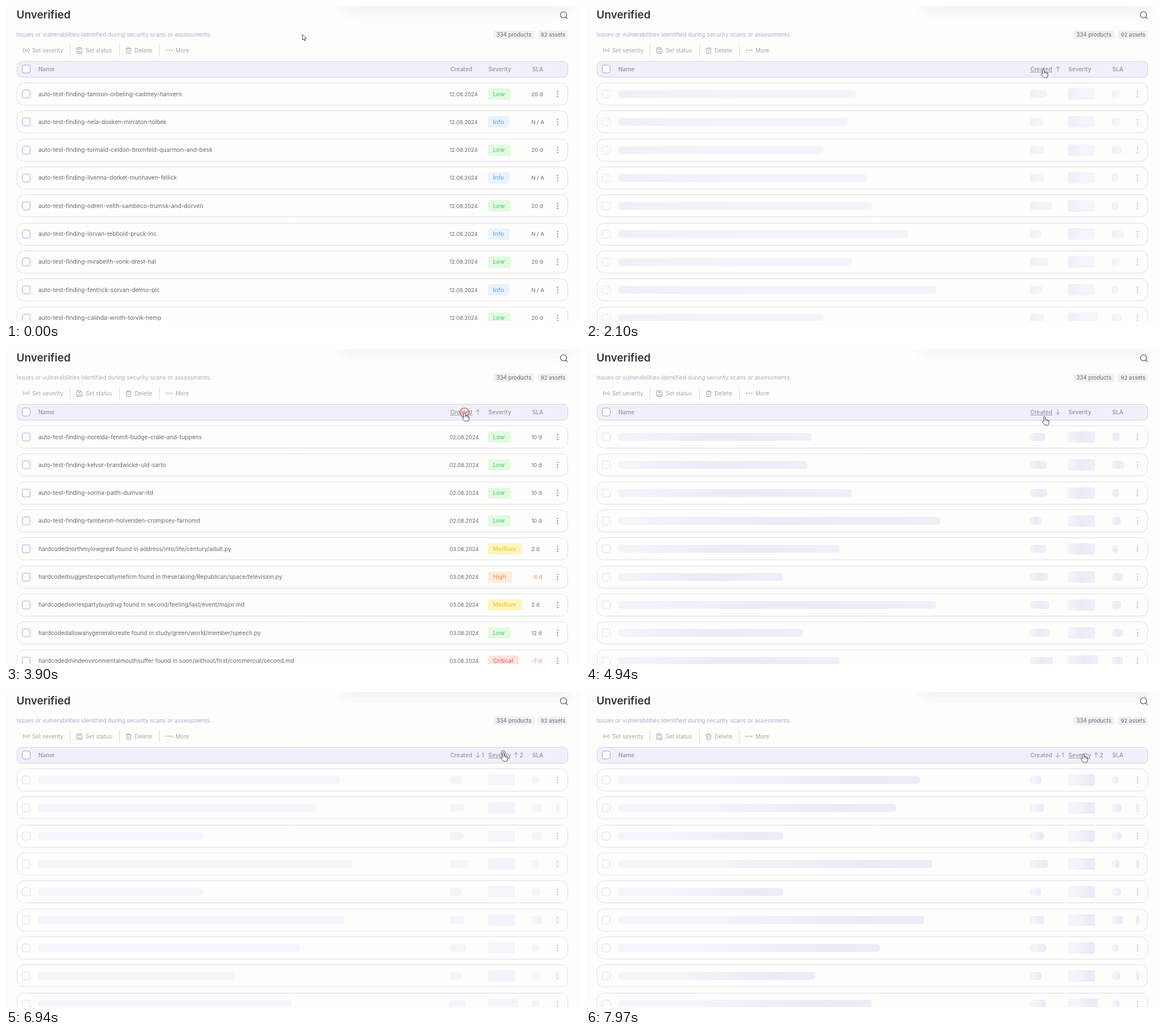
Write an HTML page with a canvas that moves like this. It is 1009 by 555 pixels and loops after 8 s.

```html
<!DOCTYPE html>
<html lang="en">
<head>
<meta charset="utf-8">
<title>Unverified findings</title>
<style>
  html, body { margin: 0; width: 100%; height: 100%; overflow: hidden; background: #fdfdfb; }
  canvas { display: block; }
</style>
</head>
<body>
<canvas id="stage" width="1009" height="555"></canvas>
<script>
const ctx = document.getElementById('stage').getContext('2d');
const LOOP = 8000, SHIMMER = 1400, CHAR = 7.07;
const PAPER = '#fdfdfb', GRAY = '#a8a8ae', DARK = '#6a6a6d';

const auto = (name, sev) => ['auto-test-finding-' + name, '12.08.2024', sev, sev === 'Low' ? '20 d' : 'N / A'];
const early = name => ['auto-test-finding-' + name, '02.08.2024', 'Low', '10 d'];
const coded = (name, path, sev, sla) => [`hardcoded${name} found in ${path}`, '03.08.2024', sev, sla];

const newest = [
  'tamson-orbeling-cadmey-hanvern', 'nela-dosken-mirraton-tolbek',
  'tormald-celdon-bromfeld-quarmon-and-besk', 'ilvenna-dorket-munhaven-fellick',
  'odren-velth-sambeco-trumsk-and-dorven', 'lorvan-tebbold-pruck-inc',
  'mirabelth-vonk-drest-hal', 'fentrick-sorvan-delmo-plc', 'calinda-wroth-torvik-hemp'
].map((name, i) => auto(name, i % 2 ? 'Info' : 'Low'));

const oldest = [
  early('norelda-fenmit-budge-crale-and-tuppens'),
  early('kelvor-brandwicke-uld-sarto'),
  early('sorina-palth-dumvar-ltd'),
  early('tamberon-holvenden-crompsey-farnomd'),
  coded('northmylowgreat', 'address/into/life/century/adult.py', 'Medium', '2 d'),
  coded('suggestespeciallymefirm', 'these/along/Republican/space/television.py', 'High', '-4 d'),
  coded('seriespartybuydrug', 'second/feeling/last/event/major.md', 'Medium', '2 d'),
  coded('allowanygeneralcreate', 'study/green/world/member/speech.py', 'Low', '12 d'),
  coded('mindenvironmentalmouthsuffer', 'soon/without/first/commercial/second.md', 'Critical', '-7 d')
];

// Placeholder sizes: name in characters, date and SLA in pixels
const skeletons = [
  { name: [59, 57, 51, 62, 63, 72, 58, 79, 51], date: [30, 24, 25, 25, 40, 20, 33, 22, 26], sla: [14, 15, 18, 12, 13, 21, 14, 12, 17] },
  { name: [48, 47, 58, 80, 55, 41, 79, 46, 55], date: [28, 30, 31, 21, 29, 33, 34, 35, 41], sla: [14, 22, 13, 16, 12, 20, 17, 20, 20] },
  { name: [75, 69, 41, 78, 41, 76, 65, 49, 63], date: [21, 25, 25, 33, 20, 25, 29, 21, 29], sla: [12, 18, 17, 14, 16, 20, 12, 15, 14] }
];

const pills = {
  Low: [40, '#e2fae2', '#6ad684'],
  Info: [38, '#e9f2fd', '#7fb4f3'],
  Medium: [60, '#fef5bd', '#ebcd55'],
  High: [43, '#fdebd9', '#f1a566'],
  Critical: [54, '#fde3e2', '#ee7672']
};

const phases = [
  { from: 0, rows: newest, sort: '' },
  { from: 1610, bars: skeletons[0], sort: 'up' },
  { from: 3030, rows: oldest, sort: 'up' },
  { from: 4000, bars: skeletons[1], sort: 'down' },
  { from: 5420, rows: newest, sort: 'down' },
  { from: 6890, bars: skeletons[2], sort: 'both' }
];
const releases = [1590, 3980, 6880];

const cursorKeys = [
  [0, 521, 50], [370, 521, 50], [1170, 804, 111], [3100, 804, 111], [3600, 806, 112],
  [4100, 806, 112], [4500, 806, 119], [5700, 806, 119], [6500, 874, 107],
  [7100, 874, 107], [7500, 874, 109], [LOOP, 874, 109]
];
const arrowShape = new Path2D('M0 0V10L2.3 7.900L3.700 11.200L5.300 10.500L4 7.300H6.900Z');
const handShape = new Path2D('M-1.4 9V1.2Q-1.4 0 0 0T1.4 1.2V5.5Q3.5 4.5 4 6Q6 5.3 6.3 6.8Q8 6.3 8 8V11L6.7 15H.3L-3.6 9.8Q-4.2 8-2.6 8Z');

function text(str, x, y, size, color, weight = 400) {
  ctx.font = `${weight} ${size}px Inter, sans-serif`;
  ctx.fillStyle = color;
  ctx.fillText(str, x, y);
}

function box(x, y, w, h, r, fill, stroke) {
  ctx.beginPath();
  ctx.roundRect(x, y, w, h, r);
  if (fill) { ctx.fillStyle = fill; ctx.fill(); }
  if (stroke) { ctx.strokeStyle = stroke; ctx.lineWidth = 1; ctx.stroke(); }
}

function line(path, color, width = 1) {
  ctx.strokeStyle = color;
  ctx.lineWidth = width;
  ctx.stroke(new Path2D(path));
}

function dots(points, r, color) {
  ctx.fillStyle = color;
  for (const [x, y] of points) {
    ctx.beginPath();
    ctx.arc(x, y, r, 0, 7);
    ctx.fill();
  }
}

// Soft shadow cast by a panel above the stage
function drawPanelShadow() {
  ctx.save();
  ctx.shadowColor = 'rgba(60, 60, 50, .07)';
  ctx.shadowBlur = 24;
  ctx.shadowOffsetY = 6;
  box(590, -60, 400, 60, 8, PAPER);
  ctx.restore();
}

function drawTop() {
  drawPanelShadow();
  text('Unverified', 18.5, 22, 18.9, '#333337', 600);
  line('M985.5 15.5a5.5 5.5 0 1 1-11 0a5.5 5.5 0 1 1 11 0M984 19.5L987 22.5', '#45454a', 1.1);
  text('Issues or vulnerabilities identified during security scans or assessments.', 18.5, 54, 10, '#adacd0');
  box(857, 43, 72, 15, 3, '#f1f0f5');
  text('334 products', 862, 54, 9.7, DARK);
  box(935, 43, 52, 15, 3, '#f1f0f5');
  text('92 assets', 940, 54, 9.5, DARK);

  line('M32 74Q28.500 78 32 82M34 76Q32 78 34 80M37 76Q39 78 37 80M39 74Q42.500 78 39 82', GRAY);
  dots([[35.5, 78]], 1, GRAY);
  line('M124.500 73.500h7l2 2v8h-9zM127 73.500v3h4v-3M127 83.500v-3h4v3', GRAY);
  line('M210.500 75.500h10M213.500 75.500v-2h4v2M211.500 75.500l.7 8h6.600l.7-8M214.300 78v3M216.700 78v3', GRAY);
  dots([[282.5, 78], [287, 78], [291.5, 78]], 1.2, GRAY);
  text('Set severity', 46, 81.5, 9.8, GRAY);
  text('Set status', 140, 81.5, 9.8, GRAY);
  text('Delete', 226, 81.5, 10.2, GRAY);
  text('More', 298, 81.5, 9.8, GRAY);
  line('M112.500 68v21M199.500 68v21M269.500 68v21', '#dadadd');
}

function sortArrow(x, up) {
  const tip = up ? 106.5 : 115.5, back = up ? 4 : -4;
  line(`M${x} 106.500V115.500M${x - 3.5} ${tip + back}L${x} ${tip}L${x + 3.5} ${tip + back}`, GRAY, 1.1);
}

function drawHeader(sort, hover) {
  box(19.5, 97.5, 968, 28, 8, '#f1eff9', '#d7d3ee');
  box(28.5, 104, 14, 14, 3.5, PAPER, '#aaa0dc');
  [['Name', 57], ['Created', 781], ['Severity', 848], ['SLA', 925]].forEach(([label, x]) => {
    text(label, x, 114.5, 10, '#a0a0a8', 600);
    if (label === hover) line(`M${x} 116.500h39`, '#a0a0a8');
  });
  if (sort) sortArrow(829.5, sort === 'up');
  if (sort === 'both') {
    text('1', 836, 114.5, 10, '#a0a0a8', 600);
    sortArrow(896.5, true);
    text('2', 903, 114.5, 10, '#a0a0a8', 600);
  }
}

function shimmerBar(x, cy, w, h, progress) {
  const left = x - 3 * w * (1 - progress);
  const fill = ctx.createLinearGradient(left, 0, left + 4 * w, 0);
  fill.addColorStop(.25, '#f5f4fb');
  fill.addColorStop(.37, '#eceaf6');
  fill.addColorStop(.63, '#f5f4fb');
  box(x, cy - h / 2, w, h, h === 20 ? 4 : 5, fill);
}

function drawRow(i, phase, t) {
  const cy = 155 + i * 49.33, base = cy + 3.5;
  const top = Math.round(cy - 20) + .5;
  box(19.5, top, 968, 39, 12, null, '#dfdcf1');
  box(28.5, Math.round(cy) - 7, 14, 14, 3.5, null, phase.bars ? '#dfdde8' : '#aaa0dc');
  dots([-4.5, 0, 4.5].map(d => [969.5, cy + d]), 1.2, phase.bars ? '#b9b9c2' : '#8f8f97');

  if (phase.bars) {
    const progress = (t - phase.from) / SHIMMER % 1;
    const bars = phase.bars;
    shimmerBar(57, cy, bars.name[i] * CHAR, 14, progress);
    shimmerBar(780, cy, bars.date[i], 14, progress);
    shimmerBar(847, cy, i === 8 ? 53 : 48, 20, progress);
    shimmerBar(924, cy, bars.sla[i], 14, progress);
    return;
  }
  const [name, date, severity, sla] = phase.rows[i];
  const [width, fill, color] = pills[severity];
  text(name, 57, base, 10.2, DARK);
  text(date, 779.5, base, 9.4, DARK);
  box(847, Math.round(cy) - 10, width, 20, 4, fill);
  text(severity, 856, base, 10.3, color, 600);
  text(sla, 923.5, base, 9.5, sla[0] === '-' ? '#e58582' : DARK);
}

function cursorAt(t) {
  const next = Math.max(1, cursorKeys.findIndex(key => key[0] > t));
  const [t0, x0, y0] = cursorKeys[next - 1], [t1, x1, y1] = cursorKeys[next];
  const p = (t - t0) / (t1 - t0), e = p * p * (3 - 2 * p);
  return [x0 + (x1 - x0) * e, y0 + (y1 - y0) * e];
}

function hovered([x, y]) {
  if (y < 103 || y > 121) return '';
  if (x > 780 && x < 821) return 'Created';
  return x > 847 && x < 889 ? 'Severity' : '';
}

// The ring grows on press, holds, then shrinks after release
function ringRadius(t) {
  for (const release of releases) {
    const d = t - release;
    if (d > -160 && d < 110) return 8 * Math.min(1, (d + 160) / 80, (110 - d) / 110);
  }
  return 0;
}

function drawCursor([x, y], hand, radius) {
  if (radius) {
    ctx.beginPath();
    ctx.arc(x, y, radius, 0, 7);
    ctx.fillStyle = 'rgba(235, 90, 100, .08)';
    ctx.fill();
    ctx.strokeStyle = '#e2616d';
    ctx.lineWidth = 1.4;
    ctx.stroke();
  }
  ctx.save();
  ctx.translate(x, y);
  const shape = hand ? handShape : arrowShape;
  ctx.fillStyle = '#fff';
  ctx.fill(shape);
  ctx.strokeStyle = '#4c4c58';
  ctx.lineWidth = 1;
  ctx.lineJoin = 'round';
  ctx.stroke(shape);
  if (hand) line('M1.400 5.500V8.500M4 6V9M6.300 6.800V9.300', '#4c4c58', .8);
  ctx.restore();
}

function frame(now) {
  const t = now % LOOP;
  const phase = phases.findLast(p => p.from <= t);
  const cursor = cursorAt(t), hover = hovered(cursor);
  ctx.fillStyle = PAPER;
  ctx.fillRect(0, 0, 1009, 555);
  drawTop();
  drawHeader(phase.sort, hover);
  for (let i = 0; i < 9; i++) drawRow(i, phase, t);
  drawCursor(cursor, hover, ringRadius(t));
  requestAnimationFrame(frame);
}
requestAnimationFrame(frame);
</script>
</body>
</html>
```
